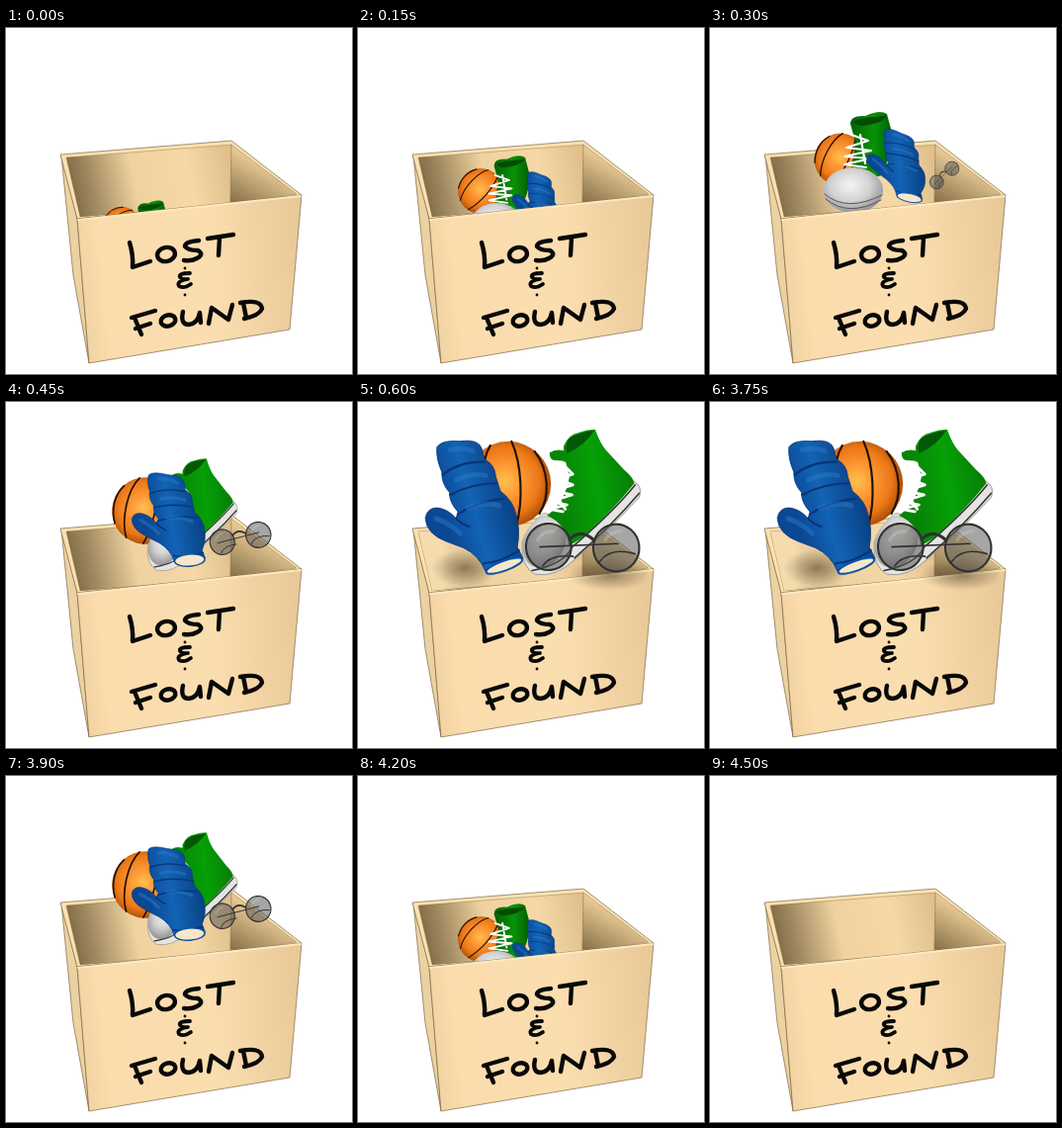
An HTML page that plays this animation: 350x350 px, repeating every 7500 ms.

```html
<!DOCTYPE html>
<html lang="en">
<head>
<meta charset="utf-8">
<title>Lost and found box</title>
<style>
  html, body { margin: 0; width: 100%; height: 100%; overflow: hidden; background: #fff; }
  svg { display: block; width: 100%; height: 100%; }
  .line { fill: none; stroke-linecap: round; stroke-linejoin: round; }
</style>
</head>
<body>
<svg viewBox="0 0 350 350" role="img" aria-label="Lost &amp; Found">
  <defs>
    <linearGradient id="backWall" gradientUnits="userSpaceOnUse" x1="62" y1="174" x2="226" y2="138">
      <stop offset="0" stop-color="#75633f"/><stop offset=".16" stop-color="#a18a61"/>
      <stop offset=".42" stop-color="#f0d29f"/><stop offset=".75" stop-color="#f5d8a6"/>
      <stop offset="1" stop-color="#dfc08d"/>
    </linearGradient>
    <linearGradient id="litWall" gradientUnits="userSpaceOnUse" x1="85" y1="0" x2="145" y2="0">
      <stop offset="0" stop-color="#f5dcae"/><stop offset="1" stop-color="#f5dcae" stop-opacity="0"/>
    </linearGradient>
    <linearGradient id="rightWall" gradientUnits="userSpaceOnUse" x1="258" y1="138" x2="236" y2="178">
      <stop offset="0" stop-color="#e6c894"/><stop offset="1" stop-color="#8b744c"/>
    </linearGradient>
    <linearGradient id="frontWall" gradientUnits="userSpaceOnUse" x1="73" y1="265" x2="297" y2="240">
      <stop offset="0" stop-color="#f0d2a2"/><stop offset=".12" stop-color="#fadcad"/>
      <stop offset=".6" stop-color="#fbdeb0"/><stop offset="1" stop-color="#e9c998"/>
    </linearGradient>
    <radialGradient id="orange" gradientUnits="userSpaceOnUse" cx="151" cy="68" r="60">
      <stop offset="0" stop-color="#ffc04e"/><stop offset=".3" stop-color="#ff9c38"/>
      <stop offset=".7" stop-color="#ec7716"/><stop offset="1" stop-color="#9c4406"/>
    </radialGradient>
    <linearGradient id="blue" gradientUnits="userSpaceOnUse" x1="38" y1="100" x2="124" y2="72">
      <stop offset="0" stop-color="#0a4894"/><stop offset=".4" stop-color="#1363b5"/>
      <stop offset="1" stop-color="#073c7c"/>
    </linearGradient>
    <linearGradient id="green" gradientUnits="userSpaceOnUse" x1="240" y1="75" x2="330" y2="60">
      <stop offset="0" stop-color="#078207"/><stop offset=".5" stop-color="#06a006"/>
      <stop offset="1" stop-color="#077c07"/>
    </linearGradient>
    <linearGradient id="greenFront" gradientUnits="userSpaceOnUse" x1="142" y1="110" x2="185" y2="110">
      <stop offset="0" stop-color="#046004"/><stop offset=".55" stop-color="#089308"/>
      <stop offset="1" stop-color="#045c04"/>
    </linearGradient>
    <radialGradient id="rubber" cx=".45" cy=".4" r=".62">
      <stop offset="0" stop-color="#f4f6f2"/><stop offset=".55" stop-color="#d2d2d2"/>
      <stop offset="1" stop-color="#909090"/>
    </radialGradient>
    <radialGradient id="shade">
      <stop offset="0" stop-color="#4a3a20" stop-opacity=".55"/>
      <stop offset="1" stop-color="#4a3a20" stop-opacity="0"/>
    </radialGradient>
  </defs>

  <g stroke="#7c6947" stroke-width=".7" stroke-linejoin="round">
    <path d="M56 129L72 193L84 339L68 250Z" fill="#ecd1a2"/>
    <path d="M55 128L228 114L299 169L72 193Z" fill="#fde1b1"/>
    <path d="M61 131L228 118L227 178L75 191Z" fill="url(#backWall)" stroke-width=".4"/>
    <path d="M228 118L294 168L227 178Z" fill="url(#rightWall)" stroke-width=".4"/>
  </g>

  <g id="items">
    <g id="light">
      <path d="M61 131L150 124L150 183L75 191Z" fill="url(#litWall)"/>
      <ellipse cx="108" cy="168" rx="34" ry="19" fill="url(#shade)"/>
    </g>
    <g id="ball">
      <circle cx="155" cy="71" r="52" fill="url(#orange)"/>
      <path class="line" stroke="#211208" stroke-width="2.6"
        d="M133 24C120 46 121 92 137 119M159 19C172 48 173 92 165 121M187 31C205 54 206 86 193 107M113 42C102 60 103 83 114 102"/>
    </g>
    <g id="shoeFront">
      <path fill="url(#greenFront)" d="M142 97Q142 88 157 89Q172 82 179 87L184 106Q185 130 172 150L142 150L147 115Z"/>
      <path fill="#034c03" d="M144 95Q154 90 179 89Q172 98 151 99Z"/>
      <ellipse cx="145" cy="164" rx="30" ry="23" fill="url(#rubber)"/>
      <path class="line" stroke="#555" d="M116 168Q138 187 174 169M117 173Q140 192 173 174"/>
      <path class="line" stroke="#fff" stroke-width="2.2" d="M143 108L160 114L138 121L163 124L136 130L163 132L136 138L158 141M152 108L157 137"/>
    </g>
    <g id="shoe">
      <path fill="#e4e4e1" stroke="#777" stroke-width=".8"
        d="M330 70Q342 77 337 90Q300 130 259 165Q238 186 212 183Q194 174 196 145Q202 124 222 109L280 120Z"/>
      <ellipse cx="223" cy="143" rx="25" ry="33" transform="rotate(24 223 143)" fill="url(#rubber)"/>
      <path fill="url(#green)" d="M246 38L246 28Q252 14 264 12Q274 8 284 8Q290 25 297 33L319 57Q330 66 331 73Q308 102 278 130Q266 142 252 148Q250 122 226 112Q248 95 253 65Z"/>
      <path fill="url(#green)" d="M250 35Q238 30 229 36Q229 43 233 45L244 46L256 50Z"/>
      <path fill="#045704" d="M283 9Q262 12 252 20Q247 28 250 37Q272 27 283 9Z"/>
      <path class="line" stroke="#333" stroke-width="1.8" d="M332 75Q306 107 256 150Q246 171 208 178M337 85Q304 124 259 163"/>
      <ellipse cx="228" cy="129" rx="12" ry="8" transform="rotate(-30 228 129)" fill="#f0f8ec"/>
      <path class="line" stroke="#fff" stroke-width="3.4"
        d="M245 50L257 62L238 67L257 75L234 82L256 87L230 95L250 99L228 104L245 107M243 49Q256 58 239 66Q231 82 248 104"/>
    </g>
    <g id="mitt">
      <path fill="url(#blue)" stroke="#06367a" d="M93 175Q84 155 65 147L44 140Q20 132 18 113Q20 100 32 100Q45 101 55 112L57 104Q46 93 46 81Q36 71 36 57Q28 40 29 27Q34 18 56 19Q79 15 83 27L87 40Q99 45 101 60L107 77Q123 88 127 105Q133 122 130 144L137 157Q121 175 93 175Z"/>
      <path class="line" stroke="#06357a" stroke-width="2.6" d="M37 60Q57 43 87 43M47 84Q72 69 103 68M57 107Q81 90 112 86M55 112Q62 119 71 121M90 165Q112 163 132 148"/>
      <path class="line" stroke="#2c7cc9" stroke-width="6" opacity=".45" d="M45 30Q59 25 72 30M54 66Q72 56 89 59M69 99Q90 90 106 95M31 113Q49 119 61 130"/>
      <ellipse id="cuff" cx="115" cy="167" rx="23" transform="rotate(-22 115 167)" fill="#f5e6cc" stroke="#0b50a0" stroke-width="2.4"/>
    </g>
    <g id="shadow">
      <ellipse cx="252" cy="192" rx="46" ry="20" fill="url(#shade)"/>
    </g>
    <g id="glasses" class="line" stroke="#303030" stroke-width="2.6">
      <g fill="#555" fill-opacity=".52">
        <circle cx="173" cy="156" r="29"/>
        <circle cx="259" cy="166" r="29.5"/>
      </g>
      <path d="M162 155L262 161M163 179Q174 165 203 171M236 181Q252 164 282 176" stroke-width="2"/>
      <path d="M201 149Q217 137 232 154" stroke-width="4"/>
      <path d="M160 146Q168 136 180 137M246 155Q254 145 267 146" stroke="#ddd" stroke-width="4" opacity=".25"/>
    </g>
  </g>

  <g id="front">
    <path d="M72 193L299 169L287 305L84 339Z" fill="url(#frontWall)" stroke="#7c6947" stroke-width=".7" stroke-linejoin="round"/>
    <path class="line" d="M73 194L298 170" stroke="#ffe9c0" stroke-width="2"/>
    <g class="line" stroke="#080808" stroke-width="4.4">
      <path d="M125 217Q129 230 128 242L146 236"/>
      <ellipse cx="162" cy="229" rx="9" ry="7" transform="rotate(-12 162 229)"/>
      <path d="M195 215Q181 216 181 221Q184 225 194 225Q201 229 193 233Q188 236 180 235"/>
      <path d="M204 213L230 209M216 212L215 230"/>
      <path d="M186 248Q174 248 176 252Q178 255 184 254Q172 256 175 261Q180 264 187 259" stroke-width="3.8"/>
      <path d="M181 243v0M181 270v0" stroke-width="2.8"/>
      <path d="M127 293L151 286M130 293L137 310M131 304L146 299"/>
      <ellipse cx="164" cy="296" rx="7.5" ry="5.5" transform="rotate(-15 164 296)"/>
      <path d="M179 287Q176 300 185 300Q194 299 196 288L197 298"/>
      <path d="M205 299L208 283L225 295L229 280"/>
      <path d="M240 278L243 293M237 278Q258 274 259 284Q256 291 241 294"/>
    </g>
  </g>
</svg>
<script>
const el = id => document.getElementById(id);
const STEP = 150, LOOP = 7500, HOLD_END = 3750;

// Each pose: x, y of the pivot, rotation, horizontal and vertical scale.
const parts = {
  light: { pivot: [0, 0], poses: [, , , , [0, 0, 0, 1, 1], [0, 0, 0, 1, 1]] },
  ball: { pivot: [155, 71], poses: [
    [117, 200, 60, .37, .37], [124, 165, 45, .44, .44], [132, 133, 30, .51, .51],
    [141, 110, 15, .65, .65], [152, 83, 0, .83, .83], [155, 71, 0, 1, 1]] },
  shoeFront: { pivot: [146, 187], poses: [
    [136, 246, 0, .7, .7], [141, 216, 0, .85, .85], [146, 187, 0, 1, 1]] },
  shoe: { pivot: [215, 187], poses: [, , ,
    [154, 173, 3, .62, .66], [182, 178, 0, .84, .84], [215, 187, 0, 1, 1]] },
  mitt: { pivot: [115, 165], poses: [,
    [190, 205, 24, .46, .34], [202, 171, 24, .58, .38],
    [186, 159, 12, .68, .54], [148, 164, 2, .84, .84], [115, 165, 0, 1, 1]] },
  shadow: { pivot: [216, 161], poses: [, , , , [222, 150, 0, .9, .8], [216, 161, 0, 1, 1]] },
  glasses: { pivot: [216, 161], poses: [, ,
    [237, 149, -48, .24, .24], [237, 138, -18, .43, .44],
    [227, 147, -6, .79, .81], [216, 161, 0, 1, 1]] }
};

function poseAt(t) {
  if (t < HOLD_END) return Math.min(5, Math.floor(t / STEP));
  return Math.max(-1, 4 - Math.floor((t - HOLD_END) / STEP));
}

function show(index) {
  for (const [id, { pivot, poses }] of Object.entries(parts)) {
    const pose = poses[index], node = el(id);
    node.style.display = pose ? "" : "none";
    if (!pose) continue;
    const [x, y, turn, sx, sy] = pose;
    node.setAttribute("transform",
      `translate(${x} ${y}) rotate(${turn}) scale(${sx} ${sy}) translate(${-pivot[0]} ${-pivot[1]})`);
  }
  // The mitten's opening turns away from the viewer as it rises.
  el("cuff").setAttribute("ry", index < 4 ? 11 : 10 - index);
  // Low poses stay behind the front wall; high ones spill over it.
  if (index < 3) el("front").before(el("items"));
  else el("front").after(el("items"));
}

let current = null;
const start = performance.now();
function tick() {
  const index = poseAt((performance.now() - start) % LOOP);
  if (index !== current) show(current = index);
  requestAnimationFrame(tick);
}
tick();
</script>
</body>
</html>
```
